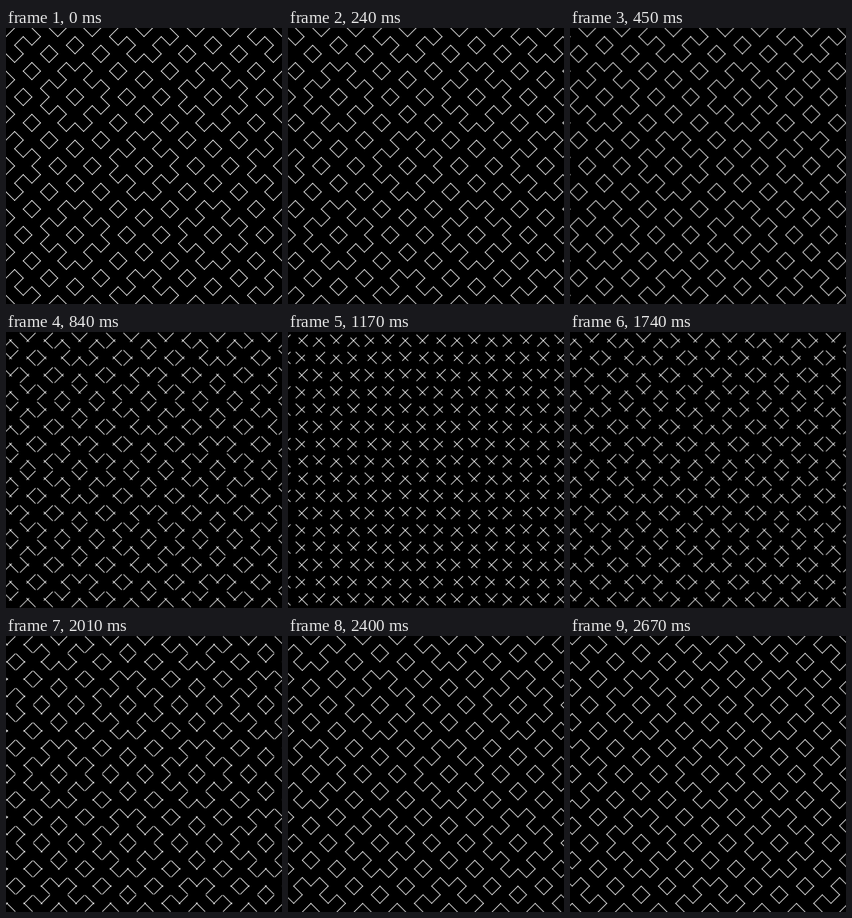
An HTML page without scripts for the animation above (2700 ms loop, 480 px wide and 480 px high).

```html
<!DOCTYPE html>
<html lang="en">
<head>
<meta charset="utf-8">
<title>Sliding corners</title>
<style>
  html, body { margin: 0; width: 100%; height: 100%; overflow: hidden; background: #000; }
  svg { display: block; width: 480px; height: 480px; }
  path { fill: none; stroke: #fff; stroke-width: 1.1; stroke-linecap: square; }

  /* Each arm slides through its corner to the opposite side. */
  .slide { animation: slide 2.7s infinite; }
  .down { --x: -15px; --y: 15px; }
  .up { --x: 15px; --y: -15px; }
  @keyframes slide {
    0% { transform: translate(0, 0); animation-timing-function: cubic-bezier(.333, 0, .667, 0); }
    50% { transform: translate(calc(var(--x) / 2), calc(var(--y) / 2)); animation-timing-function: cubic-bezier(.333, 1, .667, 1); }
    100% { transform: translate(var(--x), var(--y)); }
  }

  .drift { animation: drift 2.7s linear infinite; }
  @keyframes drift { to { transform: translateX(-360px); } }
</style>
</head>
<body>
<svg viewBox="0 0 480 480">
  <defs>
    <path id="arms" d="M0 15l15-15M90 15l15-15M150 15l15-15M180 15l15-15
      M60 45l15-15M120 45l15-15M150 45l15-15M210 45l15-15
      M30 75l15-15M90 75l15-15M120 75l15-15M180 75l15-15
      M0 105l15-15M60 105l15-15M90 105l15-15M150 105l15-15"/>
    <g id="band">
      <use href="#arms" x="-480"/>
      <use href="#arms" x="-240"/>
      <use href="#arms"/>
      <use href="#arms" x="240"/>
      <use href="#arms" x="480"/>
      <use href="#arms" x="720"/>
      <use href="#arms" x="960"/>
    </g>
    <g id="sheet">
      <use href="#band"/>
      <use href="#band" x="120" y="120"/>
      <use href="#band" y="240"/>
      <use href="#band" x="120" y="360"/>
    </g>
  </defs>
  <g class="drift">
    <g>
      <g class="slide down"><use href="#sheet"/></g>
      <g class="slide up"><use href="#sheet" x="105" y="15"/></g>
    </g>
    <!-- The other diagonal is the mirror image. -->
    <g transform="translate(720) scale(-1 1)">
      <g class="slide down"><use href="#sheet"/></g>
      <g class="slide up"><use href="#sheet" x="105" y="15"/></g>
    </g>
  </g>
</svg>
</body>
</html>
```
